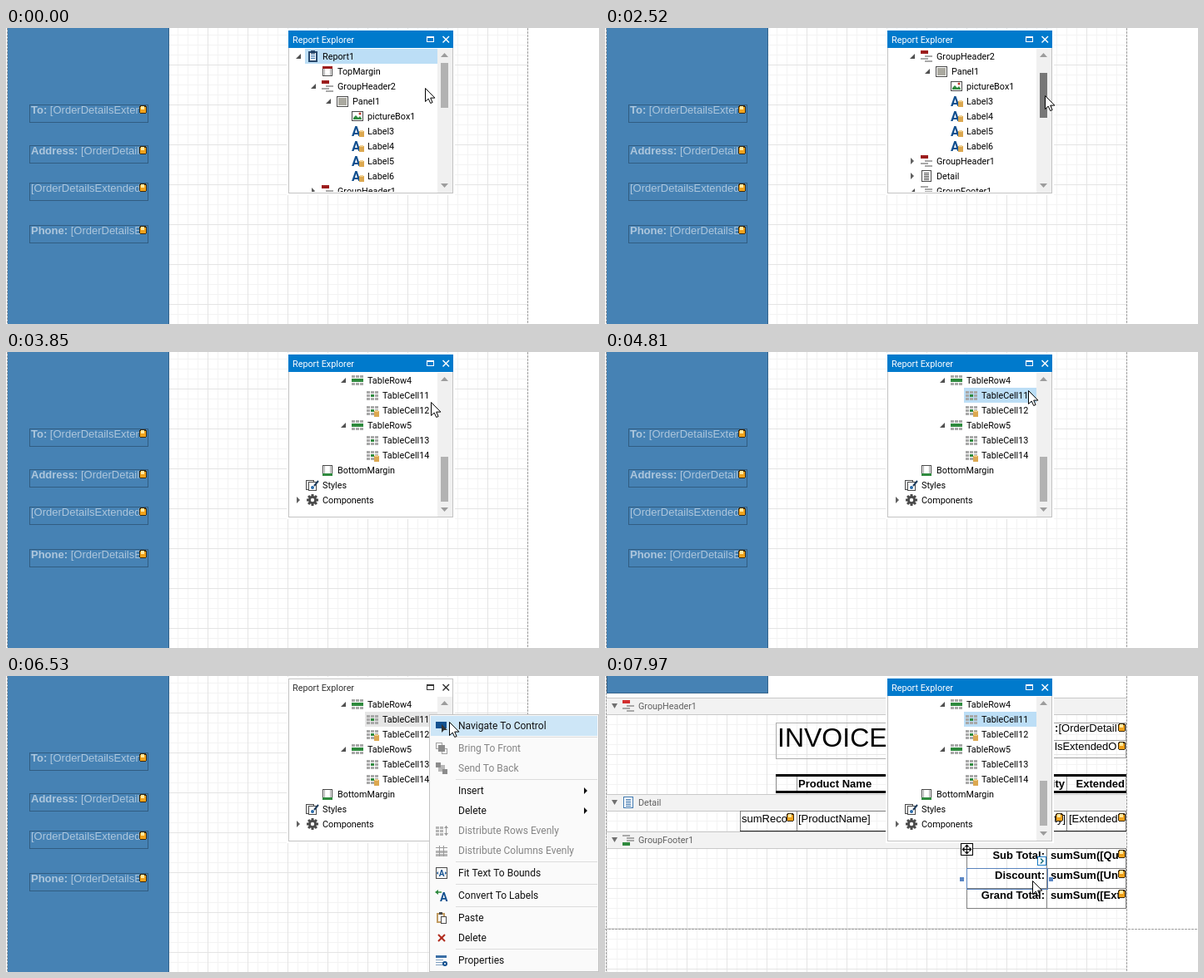
An HTML page with a canvas that plays this animation: 712 by 356 pixels, repeating every 8 s.

```html
<!DOCTYPE html>
<html lang="en">
<head>
<meta charset="utf-8">
<title>Report Explorer</title>
<style>
html, body { margin: 0; width: 100%; height: 100%; overflow: hidden; background: #fff }
canvas { display: block }
</style>
</head>
<body>
<canvas id="stage" width="712" height="356"></canvas>
<script>
const g = document.getElementById('stage').getContext('2d');
const UI = '10.8px Roboto, sans-serif', MENU = '12px Roboto, sans-serif';
const ARIAL = '13px "Liberation Sans", Arial, sans-serif', BOLD = 'bold ' + ARIAL;
const GRAY = '#a8a8a8', DARK = '#4a4a4a', GREEN = '#2f8a3e', RED = '#9c1c1c', NAVY = '#12508f', GOLD = '#dca850';

// Drawing helpers
function rect(color, x, y, w, h) {
  g.fillStyle = color;
  g.fillRect(x, y, w, h);
}
function frame(color, x, y, w, h, line = 1) {
  g.strokeStyle = color;
  g.lineWidth = line;
  g.strokeRect(x + line / 2, y + line / 2, w - line, h - line);
}
function text(str, x, y, font, color = '#000', align = 'left') {
  g.font = font;
  g.fillStyle = color;
  g.textAlign = align;
  g.fillText(str, x, y);
  return g.measureText(str).width;
}
function poly(color, ...p) {
  g.fillStyle = color;
  g.beginPath();
  for (let i = 0; i < p.length; i += 2) g.lineTo(p[i], p[i + 1]);
  g.closePath();
  g.fill();
}
function line(color, width, ...p) {
  g.strokeStyle = color;
  g.lineWidth = width;
  g.beginPath();
  for (let i = 0; i < p.length; i += 2) g.lineTo(p[i], p[i + 1]);
  g.stroke();
}
function dashed(...p) {
  g.setLineDash([3, 1]);
  line('#a0a0a0', 1, ...p);
  g.setLineDash([]);
}
function dot(color, x, y, r) {
  g.fillStyle = color;
  g.beginPath();
  g.arc(x, y, r, 0, 7);
  g.fill();
}
function clipped(x, y, w, h, draw) {
  g.save();
  g.beginPath();
  g.rect(x, y, w, h);
  g.clip();
  draw();
  g.restore();
}
function cells(color, x, y, cols, rows) {
  for (let c = 0; c < cols; c++)
    for (let r = 0; r < rows; r++) rect(color, x + c * 5, y + r * 4, 4, 3);
}
function dataMark(x, y) {
  rect('#3a2a10', x, y + 1, 9, 8);
  rect('#3a2a10', x + 1, y, 7, 10);
  rect('#f0a21c', x + 1, y + 2, 7, 7);
  rect('#ffe9a0', x + 2, y + 1, 4, 4);
}
function cylinder(x, y) {
  rect(GOLD, x, y + 1, 6, 7);
  rect('#f0cf90', x + 1, y, 4, 2);
}

// Icons, drawn around the origin
const icons = {
  report() {
    rect('#28486c', -5, -6, 11, 13);
    rect('#fff', -3, -4, 7, 9);
    rect('#28486c', -2, -7, 5, 4);
    for (let y = -2; y < 4; y += 2) rect('#3f78b0', -2, y, 5, 1);
  },
  top() { frame(DARK, -6, -6, 12, 12); rect(RED, -6, -6, 12, 3); line(GRAY, 1, -3.5, -3, -3.5, 5); line(GRAY, 1, 3.5, -3, 3.5, 5); },
  bottom() { frame(DARK, -6, -6, 12, 13); rect(GREEN, -6, 4, 12, 3); line(GRAY, 1, -3.5, -5, -3.5, 4); line(GRAY, 1, 3.5, -5, 3.5, 4); },
  header(color = RED) {
    rect(color, -7, -7, 9, 4);
    rect(GRAY, -2, -1, 9, 2);
    rect(GRAY, -7, 2, 9, 2);
    rect(GRAY, -2, 5, 9, 2);
  },
  footer() {
    rect(GRAY, -7, -6, 9, 2);
    rect(GRAY, -2, -3, 9, 2);
    rect(GRAY, -2, 0, 9, 2);
    rect(GREEN, -7, 3, 9, 4);
  },
  panel() { frame(DARK, -7, -6, 14, 13); rect('#aaa9a0', -5, -4, 10, 9); },
  picture() {
    frame(DARK, -7, -6, 14, 12);
    poly(GREEN, -5, 4, -5, 2, -2, -1, 1, 2, 3, 0, 5, 3, 5, 4);
    dot('#c0392b', 3, -3, 1.5);
  },
  label() { text('A', -7, 6, 'bold 16px Roboto, sans-serif', NAVY); cylinder(2, -1); },
  detail(color = DARK) {
    rect('#fff', -6, -7, 12, 14);
    frame(color, -6, -7, 12, 14);
    for (let y = -4; y < 5; y += 2) rect(color, -3, y, 6, 1);
  },
  table() { rect(NAVY, -7, -6, 14, 4); cells(GRAY, -7, -1, 3, 2); },
  row() { cells(GRAY, -7, -6, 3, 1); rect(GREEN, -7, -2, 14, 4); cells(GRAY, -7, 3, 3, 1); },
  cell() { cells(GRAY, -7, -5, 3, 3); rect(GREEN, -2, -1, 4, 3); },
  boundCell() { icons.cell(); cylinder(2, 0); },
  styles() {
    frame(DARK, -8, -6, 10, 12);
    rect('#fff', -5, -4, 10, 11);
    frame(DARK, -5, -4, 10, 11);
    line('#1f3c5c', 2, 7, -5, 2, 1);
    dot('#2a6aa8', 0, 3, 2);
  },
  gear() {
    for (let a = 0; a < 4; a++) {
      const x = Math.cos(a * Math.PI / 4) * 7, y = Math.sin(a * Math.PI / 4) * 7;
      line(DARK, 3, -x, -y, x, y);
    }
    dot(DARK, 0, 0, 5);
    dot('#fff', 0, 0, 2.2);
  },
  navigate() { rect(NAVY, -7, -5, 13, 8); poly('#333', 0, -2, 0, 8, 3, 5, 7, 5); },
  front() { frame('#a0a0a0', -7, -7, 8, 8); frame('#a0a0a0', 0, 0, 7, 7); rect('#8c8c8c', -4, -4, 8, 8); },
  back() { rect('#b8b8b8', -4, -4, 8, 8); rect('#8c8c8c', -7, -7, 6, 6); rect('#8c8c8c', 1, 1, 6, 6); },
  rows() { cells('#b4b4b4', -7, -5, 2, 3); line('#999', 1, 5.5, -6, 5.5, 6); poly('#999', 3, -3, 8, -3, 5.5, -6); poly('#999', 3, 3, 8, 3, 5.5, 6); },
  columns() { cells('#b4b4b4', -7, 0, 3, 2); line('#999', 1, -7, -3.5, 7, -3.5); line('#999', 1, -2.5, -6, -2.5, 7); line('#999', 1, 2.5, -6, 2.5, 7); },
  fit() {
    frame(DARK, -7, -7, 14, 14);
    text('A', 0, 4, 'bold 10px Roboto, sans-serif', NAVY, 'center');
    poly(NAVY, -6, 0, -4, -2, -4, 2);
    poly(NAVY, 6, 0, 4, -2, 4, 2);
  },
  convert() { text('A', -2, 7, 'bold 14px Roboto, sans-serif', NAVY); line(GREEN, 1.5, -7, -4, 0, -4); poly(GREEN, -8, -4, -4, -7, -4, -1); },
  paste() { frame('#c09a60', -6, -6, 10, 12, 2); rect(DARK, -3, -7, 4, 3); rect('#fff', -1, -2, 7, 9); frame(DARK, -1, -2, 7, 9); },
  remove() { line('#b02a1c', 2, -4, -4, 4, 4); line('#b02a1c', 2, 4, -4, -4, 4); },
  properties() { rect('#3a6ea5', -7, -6, 13, 3); for (let y = -1; y < 6; y += 3) rect('#7f9fc0', -7, y, 9, 1); dot(NAVY, 4, 4, 3); dot('#fff', 4, 4, 1); }
};
function icon(name, x, y, arg) {
  g.save();
  g.translate(x, y);
  icons[name](arg);
  g.restore();
}

// level, icon, caption, expander (+ closed, - open)
const tree = [
  [0, 'report', 'Report1', '-'], [1, 'top', 'TopMargin'], [1, 'header', 'GroupHeader2', '-'],
  [2, 'panel', 'Panel1', '-'], [3, 'picture', 'pictureBox1'],
  ...[3, 4, 5, 6].map(n => [3, 'label', 'Label' + n]),
  [1, 'header', 'GroupHeader1', '+'], [1, 'detail', 'Detail', '+'], [1, 'footer', 'GroupFooter1', '-'],
  [2, 'table', 'Table3', '-'], [3, 'row', 'TableRow3', '+'], [3, 'row', 'TableRow4', '-'],
  [4, 'cell', 'TableCell11'], [4, 'boundCell', 'TableCell12'], [3, 'row', 'TableRow5', '-'],
  [4, 'cell', 'TableCell13'], [4, 'boundCell', 'TableCell14'], [1, 'bottom', 'BottomMargin'],
  [0, 'styles', 'Styles'], [0, 'gear', 'Components', '+']
];

function explorer(scroll, active, selected, hot) {
  rect('#fff', 337, 1, 202, 200);
  frame('#c3c3c3', 339, 3, 198, 196);
  const ink = active ? '#fff' : '#333';
  if (active) rect('#007acc', 339, 3, 198, 21);
  text('Report Explorer', 344, 18, UI, ink);
  frame(ink, 505, 10, 9, 7);
  rect(ink, 505, 10, 9, 2);
  line(ink, 1.5, 524.5, 10, 532, 17.5);
  line(ink, 1.5, 532, 10, 524.5, 17.5);

  clipped(340, 25, 178, 172, () => tree.slice(scroll, scroll + 10).forEach(([level, kind, name, mark], i) => {
    const y = 25 + i * 18, dx = level * 18;
    if (i + scroll === selected) rect(active ? '#bcdef6' : '#e6e6e6', 359 + dx, y, 159 - dx, 18);
    if (mark === '-') poly('#505050', 348 + dx, y + 12, 354 + dx, y + 12, 354 + dx, y + 6);
    if (mark === '+') poly('#606060', 349 + dx, y + 5, 353 + dx, y + 9, 349 + dx, y + 13);
    icon(kind, 368 + dx, y + 9);
    text(name, 380 + dx, y + 13, UI);
  }));

  rect('#f0f0f0', 518, 25, 18, 173);
  poly('#9c9c9c', 522, 35, 526.5, 30, 531, 35);
  poly('#9c9c9c', 522, 187, 526.5, 192, 531, 187);
  rect(hot ? '#777' : '#b2b2b2', 522, 42 + scroll * 6, 9, 54);
}

// Design surface
function grid(top, bottom, origin = top) {
  clipped(2, top, 624, bottom - top, () => {
    for (const [step, color] of [[12, '#f3f3f3'], [48, '#e4e4e4']]) {
      for (let x = 2; x < 626; x += step) rect(color, x, top, 1, bottom - top);
      for (let y = origin; y < bottom; y += step) rect(color, 2, y, 624, 1);
    }
  });
}
function addressPage() {
  grid(0, 356, -4);
  rect('#4682b4', 2, 0, 194, 356);
  rect('#35648b', 195, 0, 1, 356);
  [['To: ', 92], ['Address: ', 141], ['', 186], ['Phone: ', 237]].forEach(([title, y]) => {
    frame('#315d82', 28, y, 143, 22);
    clipped(29, y, 133, 22, () => {
      const w = text(title, 30, y + 11, BOLD, '#adc6dc');
      text('[OrderDetailsExtended', 30 + w, y + 11, ARIAL, '#adc6dc');
    });
    dataMark(160, y + 1);
  });
}
function band(y, name, kind, color) {
  rect('#f2f2f2', 1, y, 625, 20);
  rect('#c9c9c9', 1, y, 625, 1);
  rect('#c9c9c9', 1, y + 20, 625, 1);
  poly('#707070', 8, y + 7, 15, y + 7, 11.5, y + 13);
  icon(kind, 28, y + 10, color);
  text(name, 40, y + 14, UI, '#606060');
}
function invoicePage(hover) {
  grid(46, 142);
  grid(162, 187);
  grid(207, 304);
  grid(304, 356);
  rect('#4682b4', 2, 0, 194, 20);
  frame('#35648b', 2, -1, 194, 22);
  band(26, 'GroupHeader1', 'header', '#d32f2f');
  band(142, 'Detail', 'detail', '#3f78b0');
  band(187, 'GroupFooter1', 'footer');

  frame('#b0b0b0', 205, 56, 240, 44);
  text('INVOICE', 207, 85, '32px "Liberation Sans", Arial, sans-serif');
  frame('#a0a0a0', 445, 56, 181, 22);
  frame('#a0a0a0', 445, 77, 181, 22);
  text(':', 540, 67, BOLD);
  text('[OrderDetail', 544.5, 67, ARIAL);
  text('lsExtendedO', 540, 89, ARIAL);
  dataMark(616, 57);
  dataMark(616, 79);

  rect('#000', 205, 118, 421, 3);
  rect('#000', 205, 138, 421, 3);
  for (const x of [205, 230, 554, 625]) rect('#909090', x, 121, 1, 17);
  text('Product Name', 232, 134, BOLD);
  text('Quantity', 552, 134, BOLD, '#000', 'right');
  text('Extended', 624, 134, BOLD, '#000', 'right');

  frame('#808080', 162, 162, 464, 25);
  for (const x of [230, 554]) rect('#808080', x, 162, 1, 24);
  rect('#202020', 162, 186, 464, 1);
  text('sumReco', 164, 176, ARIAL);
  text('[ProductName]', 232, 176, ARIAL);
  text('[Quantity]', 553, 176, ARIAL, '#000', 'right');
  text('[Extended', 557, 176, ARIAL);
  for (const x of [218, 541, 616]) dataMark(x, 165);

  [['Sub Total:', 'Qu'], ['Discount:', 'Un'], ['Grand Total:', 'Ext']].forEach(([name, field], i) => {
    const y = 207 + i * 24;
    frame('#808080', 434, y, 97, 25);
    frame('#808080', 530, y, 96, 25);
    text(name, 528, y + 13, BOLD, '#000', 'right');
    clipped(532, y, 86, 24, () => text('sumSum([' + field, 535, y + 13, BOLD));
    dataMark(616, y + 2);
  });
  frame('#5a83bd', 434, 231, 98, 26);
  rect('#5a86c4', 426, 242, 5, 5);
  rect('#5a86c4', 533, 242, 5, 5);
  rect(hover ? '#fff' : '#1a7cc8', 519, 217, 11, 11);
  frame('#1a7cc8', 519, 217, 11, 11);
  line(hover ? '#1a7080' : '#fff', 1.5, 523, 219.5, 526, 222.5, 523, 225.5);
  if (hover) moveHandle(434.5, 208.5);
  dashed(0, 304.5, 712, 304.5);
}
function moveHandle(x, y) {
  rect('#fff', x - 7.5, y - 7.5, 15, 15);
  frame('#000', x - 7.5, y - 7.5, 15, 15);
  line('#000', 1, x - 5, y, x + 5, y);
  line('#000', 1, x, y - 5, x, y + 5);
  for (const s of [-1, 1]) {
    poly('#000', x + 6 * s, y, x + 3 * s, y - 3, x + 3 * s, y + 3);
    poly('#000', x, y + 6 * s, x - 3, y + 3 * s, x + 3, y + 3 * s);
  }
}

// Context menu: caption, centre, icon (none opens a submenu), disabled
const menuItems = [
  ['Navigate To Control', 60, 'navigate'], ['Bring To Front', 87, 'front', true],
  ['Send To Back', 111, 'back', true], ['Insert', 138], ['Delete', 162],
  ['Distribute Rows Evenly', 186, 'rows', true], ['Distribute Columns Evenly', 210, 'columns', true],
  ['Fit Text To Bounds', 237, 'fit'], ['Convert To Labels', 264, 'convert'],
  ['Paste', 291, 'paste'], ['Delete', 315, 'remove'], ['Properties', 342, 'properties']
];
function menu(hover) {
  rect('#fafafa', 508, 46, 204, 310);
  frame('#c4c4c4', 508, 46, 204, 310);
  if (hover) rect('#cde6f7', 510, 48, 200, 24);
  for (const y of [73, 124, 223, 250, 277, 328]) rect('#dcdcdc', 540, y, 170, 1);
  for (const [name, y, kind, disabled] of menuItems) {
    text(name, 543, y + 4, MENU, disabled ? '#858585' : '#111');
    if (kind) icon(kind, 523, y);
    else poly('#111', 694, y - 4, 698, y, 694, y + 4);
  }
}

function pointer(x, y) {
  const p = [0, 0, 0, 16, 3.7, 12.6, 6.2, 18, 8.6, 17, 6.2, 11.6, 11.4, 11.6].map((v, i) => v + 0.5 + (i % 2 ? y : x));
  poly('#fff', ...p);
  line('#000', 1, ...p, p[0], p[1]);
}

// time, x, y
const path = [
  [0, 503, 72], [930, 503, 72], [1410, 528, 69], [2220, 528, 69], [2520, 528, 81], [3030, 524, 140],
  [3240, 524, 160], [3420, 524, 162], [3850, 510, 60], [4000, 513, 55], [4130, 511, 50],
  [4560, 511, 50], [4810, 508, 46], [5880, 508, 46], [6530, 532, 55], [6920, 532, 55],
  [7700, 527, 126], [7970, 513, 246], [8000, 513, 246]
];
function cursorAt(t) {
  const i = path.findIndex(p => p[0] > t), a = path[i - 1], b = path[i];
  const k = (t - a[0]) / (b[0] - a[0]);
  return [1, 2].map(n => Math.round(a[n] + (b[n] - a[n]) * k));
}

function draw() {
  const t = performance.now() % 8000;
  const [x, y] = cursorAt(t);
  const scroll = t < 2240 ? 0 : t < 3240 ? Math.min(14, Math.floor((y - 69) / 6)) : 14;
  const hot = x > 520 && t < 3850 && y >= 42 + scroll * 6;
  const selected = t < 4390 ? 0 : 15;
  const active = t < 5770 || t >= 6760;

  rect('#fff', 0, 0, 712, 356);
  if (t < 6920) addressPage();
  else invoicePage(y > 205);
  dashed(1.5, 0, 1.5, 356);
  dashed(626.5, 0, 626.5, 356);
  explorer(scroll, active, selected, hot);
  if (t >= 5770 && t < 6630) menu(y > 48);
  pointer(x, y);
  requestAnimationFrame(draw);
}
draw();
</script>
</body>
</html>
```
